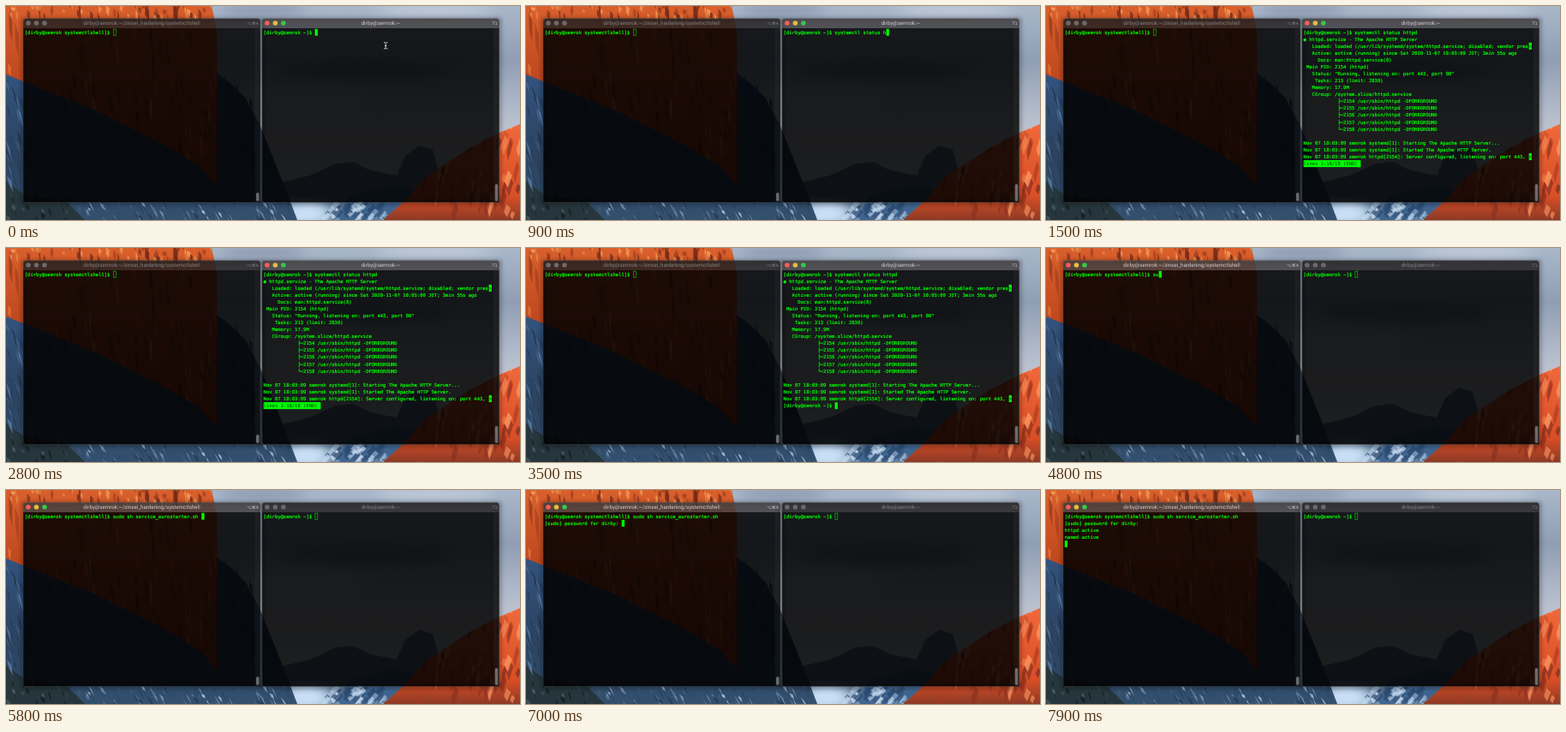
These frames come from a looping animation (600 px wide and 250 px high, 8000 ms). An HTML page:

```html
<!DOCTYPE html>
<html lang="en">
<head>
<meta charset="utf-8">
<title>Two terminals</title>
<style>
  html, body { margin: 0; width: 100%; height: 100%; overflow: hidden; background: #242a3a; }
  svg { display: block; }
  text { white-space: pre; text-rendering: geometricPrecision; }
  .mono { font: 5.53px "DejaVu Sans Mono", monospace; fill: #0f0; stroke: #0f0; stroke-width: .2px; }
  .inverse { fill: #031; stroke: none; }
  .title { font: 6.2px Roboto, sans-serif; text-anchor: middle; }
  .tab { font: 5px "DejaVu Sans", sans-serif; text-anchor: end; }
</style>
</head>
<body>
<svg width="600" height="250" viewBox="0 0 600 250">
  <defs>
    <linearGradient id="sky" x2="0" y2="1">
      <stop offset="0" stop-color="#a9b7ca"/>
      <stop offset=".25" stop-color="#8f9eb4"/>
      <stop offset=".5" stop-color="#b3bccb"/>
      <stop offset=".62" stop-color="#c4c6d0"/>
      <stop offset="1" stop-color="#bdd3ea"/>
    </linearGradient>
    <linearGradient id="rock" x2="0" y2="1">
      <stop offset="0" stop-color="#d9602c"/>
      <stop offset=".5" stop-color="#b8411c"/>
      <stop offset="1" stop-color="#a8381c"/>
    </linearGradient>
    <linearGradient id="shade" x2="0" y2="1">
      <stop offset=".3" stop-color="#33547f"/>
      <stop offset=".7" stop-color="#2c4360"/>
      <stop offset="1" stop-color="#33506f"/>
    </linearGradient>
    <linearGradient id="slope" x2="0" y2="1">
      <stop offset="0" stop-color="#f0683a"/>
      <stop offset=".75" stop-color="#d84e26"/>
      <stop offset="1" stop-color="#8d3a26"/>
    </linearGradient>
    <clipPath id="cliffEdge"><path d="M0 0H240L246 30V210L225 186 186 163 100 120 0 80Z"/></clipPath>
    <clipPath id="slopeEdge"><path d="M440 250 466 227 489 200 518 181 541 166 576 148 600 138V250Z"/></clipPath>
    <filter id="soft"><feGaussianBlur stdDeviation="7"/></filter>
    <filter id="blur"><feGaussianBlur stdDeviation="2.5"/></filter>
  </defs>

  <rect width="600" height="250" fill="url(#sky)"/>
  <g filter="url(#soft)">
    <ellipse cx="350" cy="110" rx="80" ry="18" fill="#b4bfcd"/>
    <ellipse cx="420" cy="75" rx="100" ry="12" fill="#74839b"/>
    <ellipse cx="300" cy="5" rx="50" ry="8" fill="#8e9bb2"/>
    <ellipse cx="500" cy="4" rx="70" ry="6" fill="#c6d0dc"/>
  </g>
  <path d="M305 210 355 198 385 184 405 182 425 192 456 198 466 175 483 163 498 168 506 196 560 190V250H305Z" fill="#5f7894"/>
  <path d="M385 250 400 222 450 210 500 215V250Z" fill="#3f658f"/>
  <ellipse cx="350" cy="243" rx="30" ry="16" fill="#c9e0f6" filter="url(#soft)"/>
  <path d="M0 0H240L246 30V78L262 90 280 108 296 138 314 183 331 226 340 250H0Z" fill="url(#shade)"/>
  <g id="cliff" clip-path="url(#cliffEdge)"><rect width="260" height="215" fill="url(#rock)"/></g>
  <path d="M0 205 24 222 70 228 92 250H0Z" fill="#26363c"/>
  <g id="crags"></g>
  <g id="hill" clip-path="url(#slopeEdge)"><rect x="440" y="138" width="160" height="112" fill="url(#slope)"/></g>
  <g filter="url(#blur)" fill="none" stroke="#000" stroke-width="3" opacity=".45">
    <rect x="20" y="16" width="277" height="214"/>
    <rect x="299" y="16" width="277" height="214"/>
  </g>
  <g id="windows"></g>
</svg>
<script>
const CHAR = 3.33, LINE = 8.08, LOOP = 8000, STEP = 100;
const user = "dirby", host = "semrok";
const leftPrompt = `[${user}@${host} systemctlshell]$ `;
const rightPrompt = `[${user}@${host} ~]$ `;
const command = "systemctl status httpd";
const END = "lines 1-18/18 (END)";
const log = `Nov 07 18:03:09 ${host} `;
const status = [
  "● httpd.service - The Apache HTTP Server",
  "   Loaded: loaded (/usr/lib/systemd/system/httpd.service; disabled; vendor pres>",
  "   Active: active (running) since Sat 2020-11-07 18:03:09 JST; 3min 55s ago",
  "     Docs: man:httpd.service(8)",
  " Main PID: 2154 (httpd)",
  '   Status: "Running, listening on: port 443, port 80"',
  "    Tasks: 213 (limit: 2830)",
  "   Memory: 17.9M",
  "   CGroup: /system.slice/httpd.service",
  ...[2154, 2155, 2156, 2157, 2158].map(pid =>
    " ".repeat(12) + (pid < 2158 ? "├─" : "└─") + pid + " /usr/sbin/httpd -DFOREGROUND"),
  "",
  log + "systemd[1]: Starting The Apache HTTP Server...",
  log + "systemd[1]: Started The Apache HTTP Server.",
  log + "httpd[2154]: Server configured, listening on: port 443, >"
];

const byId = id => document.getElementById(id);
const rect = (x, y, w, h, attrs) => `<rect x="${x}" y="${y}" width="${w}" height="${h}" ${attrs}/>`;
const label = (x, y, cls, str, attrs = "") =>
  `<text x="${x}" y="${y}" class="${cls}" ${attrs}>${str.replace(/>/g, "&gt;")}</text>`;

// Rock texture: thin slivers from a seeded generator
let seed = 7;
const rnd = (lo, hi) => {
  seed = (seed * 16807) % 2147483647;
  return lo + (hi - lo) * seed / 2147483647;
};
function slivers(id, count, x0, x1, y0, y1, size, lean, colors) {
  let out = "";
  for (let i = 0; i < count; i++) {
    const x = rnd(x0, x1), y = rnd(y0, y1), w = rnd(1.5, 5), h = rnd(.3, 1) * size;
    out += `<path d="M${x} ${y}l${w} ${h * .3} ${lean * h - w * .4} ${h * .7} ${-w * .8} ${-h * .4}Z"
      fill="${colors[i % colors.length]}" opacity="${rnd(.35, .85)}"/>`;
  }
  byId(id).innerHTML += out;
}
slivers("cliff", 110, -5, 245, -25, 170, 40, .04, ["#6a2618", "#f08a48", "#8a2d18", "#e4612a"]);
slivers("cliff", 60, -2, 245, -10, 10, 16, .04, ["#f7a25c", "#7a2c1a"]);
slivers("crags", 40, 20, 310, 80, 190, 45, .15, ["#1c2c44", "#243a58"].slice(0, 2));
slivers("crags", 110, 85, 335, 224, 250, 16, .4, ["#c3d8ee", "#2a4260", "#7f9fc2", "#1f334c"]);
slivers("crags", 50, 375, 455, 226, 250, 14, -.5, ["#c3d8ee", "#2c4a70"]);
slivers("crags", 30, -4, 18, 85, 200, 30, .2, ["#1d2f4a", "#5f83ac"]);
slivers("crags", 30, -4, 85, 215, 250, 14, .2, ["#121c20", "#4a5f68"]);
slivers("hill", 60, 470, 600, 130, 240, 30, -.15, ["#8a3020", "#ff9a62", "#a83a20"]);

function rows(x, lines, active) {
  let out = "";
  lines.forEach((line, i) => {
    const y = 26.6 + i * LINE, base = y + 5.9;
    const cut = line === END ? 0 : line.length === 80 ? 79 : line.length;
    out += label(x, base, "mono", line.slice(0, cut));
    if (cut < line.length) {
      const tail = line.slice(cut), tx = x + cut * CHAR;
      const width = (tail.length + (line === END)) * CHAR;
      out += rect(tx, y, width, LINE, 'fill="#0f0"') + label(tx, base, "mono inverse", tail);
    }
  });
  const last = lines.length - 1;
  const cx = x + lines[last].length * CHAR, cy = 26.8 + last * LINE;
  return out + (active
    ? rect(cx, cy, CHAR, 7.9, 'fill="#0f0"')
    : rect(cx + .3, cy + .3, CHAR - .4, 7.2, 'fill="none" stroke="#0d0" stroke-width=".6"'));
}

function terminal(x, title, tab, lines, active, thumb) {
  const ink = active ? "#d0cccc" : "#838080";
  const lights = active ? ["#fc5b57", "#e5bf3c", "#34c84a"] : Array(3).fill("#6e6969");
  return `<path d="M${x} 26V18q0 -3.5 3.5 -3.5h270q3.5 0 3.5 3.5V26Z" fill="${active ? "#424042" : "#232122"}" fill-opacity=".84"/>`
    + rect(x, 26, 277, 203.5, 'fill="#000" fill-opacity=".86"')
    + rect(x + 270.5, 26, 6.5, 203.5, 'fill="#fff" fill-opacity=".04"')
    + rect(x + 272, thumb, 3.5, 228 - thumb, 'rx="1.7" fill="#888" fill-opacity=".75"')
    + rect(x + .25, 14.7, 276.5, 214.8, 'rx="3" fill="none" stroke="#777" stroke-opacity=".45" stroke-width=".5"')
    + lights.map((c, i) => `<circle cx="${x + 6 + i * 9.5}" cy="20" r="2.8" fill="${c}"/>`).join("")
    + label(x + 138.5, 22.3, "title", title, `fill="${ink}"`)
    + label(x + 275, 22, "tab", tab, `fill="${ink}"`)
    + rows(x + 1.8, lines, active);
}

const typed = (str, step, start, rate) => str.slice(0, Math.max(0, Math.floor((step - start) * rate)));

function rightLines(s) {
  if (s < 12) return [rightPrompt + typed(command, s, 2, 2.6)];
  if (s >= 37) return [rightPrompt];
  return [rightPrompt + command, ...status, s < 33 ? END : rightPrompt];
}

function leftLines(s) {
  // The file name is tab-completed after its first letters
  const lines = [leftPrompt + (s < 56 ? typed("sudo sh se", s, 46, 1.1) : "sudo sh service_aurostarter.sh ")];
  if (s >= 63) lines.push(`[sudo] password for ${user}: `);
  if (s >= 74) lines.push("httpd active");
  if (s >= 77) lines.push("named active");
  if (s >= 74) lines.push("");
  return lines;
}

const pointer = '<path d="M441 42.5q2 0 2.2 1 .2 -1 2.2 -1M443.2 43.5V49M441 50q2 0 2.2 -1 .2 1 2.2 1M442 46.5h2.4" fill="none" stroke="#ddd" stroke-width=".9"/>';

let shown = -1;
function frame() {
  const s = Math.floor(performance.now() % LOOP / STEP);
  if (s !== shown) {
    shown = s;
    const leftActive = s >= 45;
    byId("windows").innerHTML =
      terminal(20, `${user}@${host}:~/zinsei_hardening/systemctlshell`, "⌥⌘4", leftLines(s), leftActive, 218)
      + terminal(298.8, `${user}@${host}:~`, "T1", rightLines(s), !leftActive, 208)
      + (s < 8 ? pointer : "");
  }
  requestAnimationFrame(frame);
}
frame();
</script>
</body>
</html>
```
